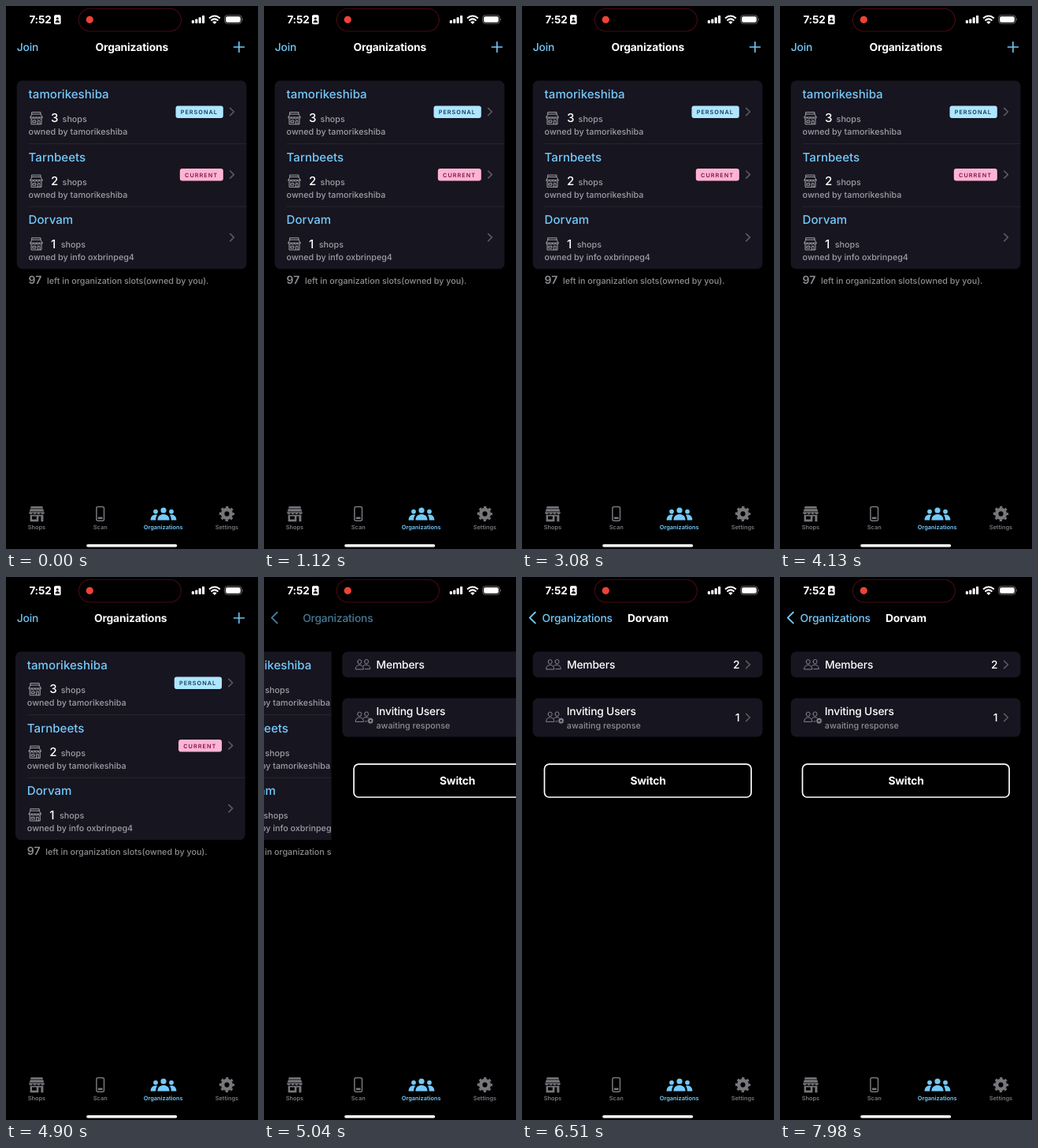
Animation, 320 px wide and 688 px high, one loop 8 s. Source, as an HTML page:

```html
<!DOCTYPE html>
<html lang="en">
<head>
<meta charset="utf-8">
<title>Organizations</title>
<style>
  html, body { margin: 0; width: 100%; height: 100%; overflow: hidden; background: #000; }
  svg { display: block; width: 320px; height: 688px; }
  text { font-family: Inter, Roboto, sans-serif; fill: #fff; white-space: pre; text-rendering: geometricPrecision; }
  .body { font-size: 13.84px; font-weight: 450; letter-spacing: -.014em; }
  .bold { font-size: 13.84px; font-weight: 650; letter-spacing: -.012em; }
  .name { font-size: 15.1px; font-weight: 480; }
  .note { font-size: 10.75px; font-weight: 450; fill: #9f9ea6; }
  .foot { fill: #8e8d93; }
  .badge { font-size: 7.3px; font-weight: 600; letter-spacing: 1px; }
  .tab { font-size: 7.4px; font-weight: 600; text-anchor: middle; fill: #77777c; }
  .mid { text-anchor: middle; }
  .end { text-anchor: end; }
  .blue { fill: #75c9fb; }
  .card { fill: #17151f; }
  .line { fill: none; stroke-linecap: round; stroke-linejoin: round; }
</style>
</head>
<body>
<svg id="stage" viewBox="0 0 320 688" xmlns="http://www.w3.org/2000/svg"></svg>
<script>
const LOOP = 8000, PUSH_START = 4889, SPRING = 17.1, TITLE_AT = 5420;
const BLUE = '#75c9fb', GRAY = '#77777c';
const OWNER = 'tamorikeshiba';
const orgs = [
  { name: OWNER, shops: 3, owner: OWNER, badge: ['PERSONAL', 215.5, '#aee6ff', '#123f58'] },
  { name: 'Tarnbeets', shops: 2, owner: OWNER, badge: ['CURRENT', 220.8, '#ffb4d6', '#7a1748'] },
  { name: 'Dorvam', shops: 1, owner: 'info oxbrinpeg4' },
];

const text = (x, y, str, cls, extra = '') => `<text x="${x}" y="${y}" class="${cls}" ${extra}>${str}</text>`;
const rect = (x, y, w, h, r, attrs) => `<rect x="${x}" y="${y}" width="${w}" height="${h}" rx="${r}" ${attrs}/>`;
const circle = (x, y, r, attrs = '') => `<circle cx="${x}" cy="${y}" r="${r}" ${attrs}/>`;
const line = (d, color, width) => `<path class="line" d="${d}" stroke="${color}" stroke-width="${width}"/>`;
const group = (id, content) => `<g id="${id}">${content}</g>`;
const at = (x, y, content) => `<g transform="translate(${x} ${y})">${content}</g>`;
const chevron = (x, y) => line(`M${x} ${y - 4.6}l4.8 4.6l-4.8 4.6`, '#5b5a64', 1.6);

// Eight teeth around a ring, one pointing straight up.
function gear(x, y, r, color) {
  const tooth = 2 * Math.PI * r * .88 / 16;
  const ring = (radius, width, dash = '') =>
    circle(x, y, radius, `fill="none" stroke="${color}" stroke-width="${width}" ${dash}`);
  return ring(r * .56, r * .48) +
    ring(r * .88, r * .24, `stroke-dasharray="${tooth}" stroke-dashoffset="${tooth / 2}"`);
}

const shopOutline = line(
  'M3 .6h11v2.4h-11zM3 3l-2.2 4h15.4l-2.2-4M.8 7c0 2.8 3.8 2.8 3.8 0c0 2.8 3.9 2.8 3.9 0c0 2.8 3.9 2.8 3.9 0' +
  'c0 2.8 3.8 2.8 3.8 0M2 9.4v6.4h13v-6.4M4.2 11.2h3.8v2.4h-3.8zM10.4 15.6v-4.4h2.6v4.4', '#a3a2a9', 1);

const shopSolid =
  `<path fill="${GRAY}" fill-rule="evenodd" d="M2.6 0h14.8l.6 2.4h-16zM1.8 3.2h16.4l1.2 3.2h-18.8zM.2 7.2h19.6` +
  `a2.4 2.6 0 0 1-4.9 .4a2.45 2.4 0 0 1-4.9 0a2.45 2.4 0 0 1-4.9 0a2.4 2.6 0 0 1-4.9-.4zM1.6 10.8h16.8v8.4h-16.8z` +
  `M4 12.6v3.8h5.8v-3.8zM12.4 12.6v6.6h3v-6.6z"/>`;

const pairOutline = line(
  'M3.2 3.4a2.5 2.7 0 1 0 5 0a2.5 2.7 0 1 0-5 0M12 3.2a2.5 2.7 0 1 0 5 0a2.5 2.7 0 1 0-5 0' +
  'M.6 12.6c0-7 10.2-7 10.2 0zM10.4 8.8c2.8-3 8.8-1.8 8.8 3.8h-6.4', '#85848d', 1);

const people =
  circle(200, 639, 3.6) + circle(190, 640.6, 2.9) + circle(210, 640.6, 2.9) +
  '<path d="M192.4 651.4c0-9.8 15.2-9.8 15.2 0zM183.6 651.4c0-5.8 4.2-8 8.6-6.6c-1.4 1.6-2 3.8-2 6.6z' +
  'M216.4 651.4c0-5.8-4.2-8-8.6-6.6c1.4 1.6 2 3.8 2 6.6z"/>';

function orgRow(org, i) {
  const y = 95 + i * 79.6;
  let out = text(28.6, y + 22, org.name, 'name blue') + at(30, y + 39, shopOutline) +
    text(57, y + 52.4, org.shops, 'name') + text(org.shops === 1 ? 69.8 : 71.6, y + 52, 'shops', 'note') +
    text(28.6, y + 68, 'owned by ' + org.owner, 'note') + chevron(284.6, y + 39);
  if (org.badge) {
    const [label, x, fill, ink] = org.badge;
    out += rect(x, y + 31.4, 275.8 - x, 15.6, 3, `fill="${fill}"`) +
      text(x + 6.2, y + 41.9, label, 'badge', `style="fill:${ink}"`);
  }
  if (i) out += rect(29, y - .4, 276.5, .8, 0, 'fill="#2b2833"');
  return out;
}

const listView = rect(13.7, 94.6, 291.8, 238.6, 7, 'class="card"') + orgs.map(orgRow).join('') +
  text(28.6, 351.8, '97', 'foot', 'style="font-size:14px;font-weight:600"') +
  text(52, 351.8, 'left in organization slots(owned by you).', 'note foot');

const detailView = rect(0, 60, 320, 570, 0, 'fill="#000"') +
  rect(13.7, 94.6, 291.8, 32.6, 7, 'class="card"') + at(30, 104, pairOutline) +
  text(57, 116, 'Members', 'body') + text(276.4, 116, '2', 'body end') + chevron(284.6, 111) +
  rect(13.7, 153.6, 291.8, 49, 7, 'class="card"') + at(30, 170.4, pairOutline) +
  circle(49.6, 182.2, 4.4, 'class="card"') + gear(49.6, 182.2, 3.9, '#85848d') +
  text(56.8, 175.2, 'Inviting Users', 'body') + text(56.8, 191.5, 'awaiting response', 'note foot') +
  text(276.4, 183, '1', 'body end') + chevron(284.6, 178) +
  rect(28.5, 237.2, 262.6, 41.8, 6, 'fill="none" stroke="#fff" stroke-width="1.7"') +
  text(160, 263, 'Switch', 'bold mid');

const navBar =
  group('actions', text(13.8, 56.8, 'Join', 'body blue') + line('M289.4 52h13M295.9 45.5v13', BLUE, 1.6)) +
  group('listTitle', text(159.8, 56.6, 'Organizations', 'bold mid')) +
  group('backArrow', line('M16.8 44.8l-7 6.8l7 6.8', BLUE, 2)) +
  group('backLabel', text(25.6, 56.6, 'Organizations', 'body blue')) +
  group('detailTitle', text(160, 56.6, orgs[2].name, 'bold mid'));

const statusBar = text(29.4, 22, '7:52', 'bold', 'style="font-size:13.5px"') +
  rect(61, 11.2, 8.6, 12, 1.8, 'fill="#fff"') + circle(65.3, 15.8, 1.5) +
  '<path d="M62.6 21c0-4 5.4-4 5.4 0z"/>' +
  rect(92.4, 3.2, 130, 28.8, 14.4, 'fill="#000" stroke="#4a0a14" stroke-width="1.1"') +
  circle(106.3, 17.3, 4.6, 'fill="#ef4238"') +
  [4, 5.6, 7.8, 10].map((h, i) => rect(235.8 + i * 4.4, 22 - h, 3.1, h, .9, 'fill="#fff"')).join('') +
  '<path fill="none" stroke="#fff" stroke-width="2" d="M258 15.6q6.9-6.2 13.8 0M260.4 18.4q4.5-4 9 0"/>' +
  '<path fill="#fff" d="M262.2 20.2q2.7-2 5.4 0l-2.7 2.7z"/>' +
  rect(277.6, 11.8, 21.6, 10.4, 3.4, 'fill="none" stroke="#77777b" stroke-width=".9"') +
  rect(279, 13.2, 18.8, 7.6, 2.2, 'fill="#fff"') +
  '<path fill="#77777b" d="M300.2 15.2q1.8 1.8 0 3.6z"/>';

const tabBar = at(29, 634, shopSolid) +
  rect(114.9, 634.5, 9.6, 17.8, 2, `fill="none" stroke="${GRAY}" stroke-width="1.5"`) +
  rect(116.8, 647.6, 5.8, 2.4, .6, `fill="${GRAY}"`) +
  `<g fill="${BLUE}">${people}</g>` + gear(280.5, 643.4, 9.6, GRAY) +
  text(38.9, 662.6, 'Shops', 'tab') + text(119.7, 662.6, 'Scan', 'tab') +
  text(199.7, 662.6, 'Organizations', 'tab', `style="fill:${BLUE}"`) + text(280.4, 662.6, 'Settings', 'tab') +
  rect(102.2, 682, 115, 3.6, 1.8, 'fill="#fff"');

document.getElementById('stage').innerHTML =
  group('list', listView) + group('detail', detailView) + navBar + statusBar + tabBar;

const clamp = v => Math.max(0, Math.min(1, v));
function place(id, x, opacity = 1) {
  const node = document.getElementById(id);
  node.setAttribute('transform', `translate(${x.toFixed(2)} 0)`);
  node.setAttribute('opacity', opacity);
}

// Critically damped push: 0 shows the list, 1 shows the detail.
function pushProgress(time) {
  const s = Math.max(0, time - PUSH_START) / 1000 * SPRING;
  return 1 - (1 + s) * Math.exp(-s);
}

function draw(time) {
  const p = pushProgress(time);
  place('list', -96 * p);
  place('detail', 320 * (1 - p));
  place('actions', 0, clamp(1 - 2 * p));
  place('listTitle', -88 * p, clamp(1 - 1.6 * p));
  place('backArrow', 0, clamp(1.5 * p - .5));
  place('backLabel', 88 * (1 - p), clamp(1.5 * p - .5));
  place('detailTitle', 0, time >= TITLE_AT ? 1 : 0);
}

const start = performance.now();
function tick() {
  draw((performance.now() - start) % LOOP);
  requestAnimationFrame(tick);
}
tick();
</script>
</body>
</html>
```
